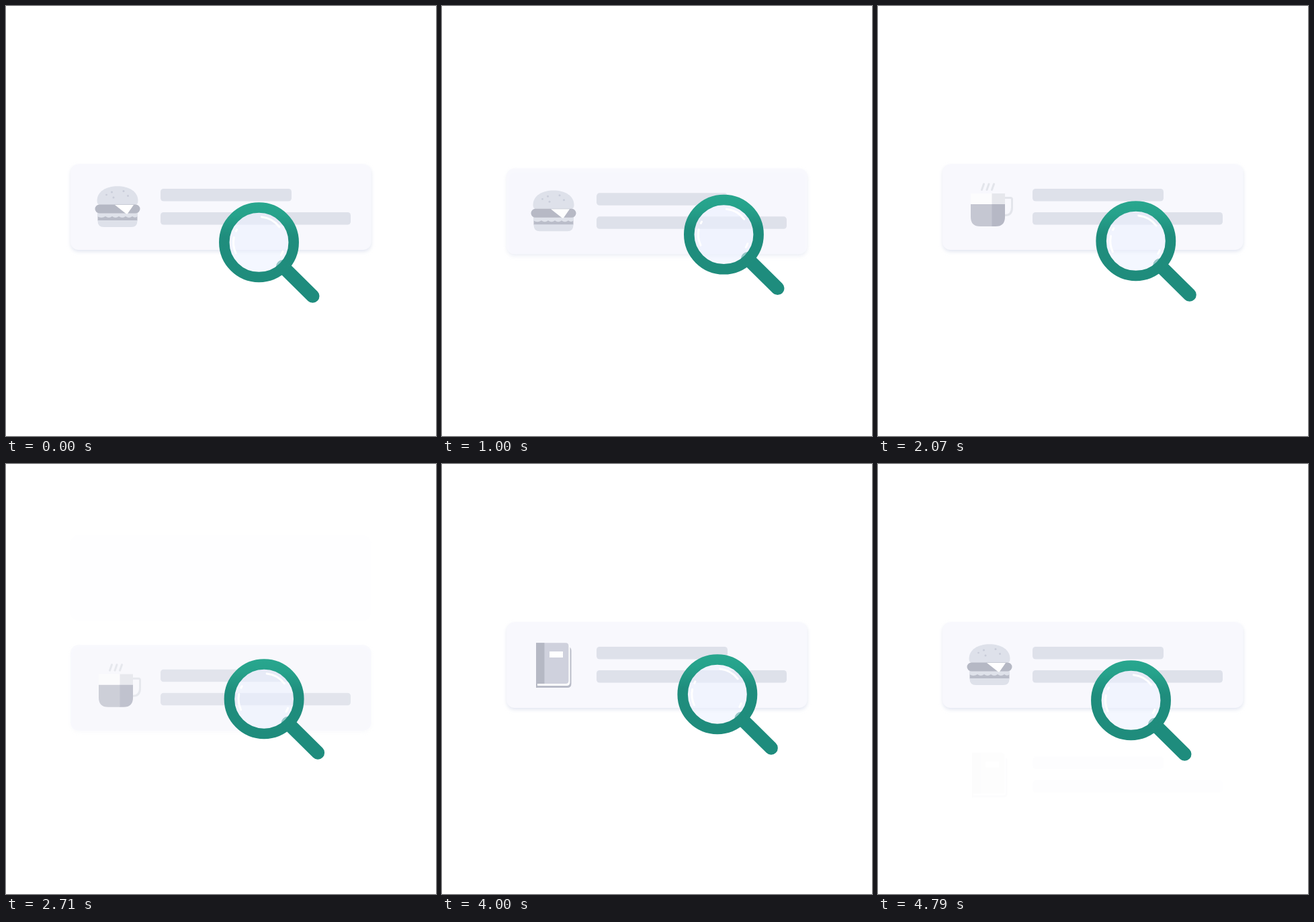
Write an HTML page that moves like this. It is 640x640 px and loops after 4870 ms.

```html
<!DOCTYPE html>
<html lang="en">
<head>
<meta charset="utf-8">
<title>Search cards</title>
<style>
  html, body { margin: 0; width: 100%; height: 100%; overflow: hidden; background: #fff; }
  svg { display: block; width: 100vw; height: 100vh; }
</style>
</head>
<body>
<svg viewBox="0 0 640 640" xmlns="http://www.w3.org/2000/svg">
  <defs>
    <filter id="soft" x="-10%" y="-20%" width="120%" height="140%">
      <feGaussianBlur stdDeviation="3"/>
    </filter>
    <linearGradient id="ring" gradientUnits="userSpaceOnUse" x1="0" y1="-58" x2="0" y2="58">
      <stop offset="0" stop-color="#28a68e"/>
      <stop offset=".15" stop-color="#26a28b"/>
      <stop offset=".42" stop-color="#1f8d7d"/>
      <stop offset="1" stop-color="#1f8c7c"/>
    </linearGradient>
    <g id="burger">
      <path fill="#dee1ea" d="M135.5 290C135.5 276 149 268.2 166 268.2S196.500 276 196.500 290Q196.500 296 191.500 296H140.500Q135.500 296 135.500 290Z"/>
      <g fill="#c8ccd9">
        <circle cx="157.500" cy="277" r="1.500"/>
        <circle cx="175" cy="275.500" r="1.500"/>
        <circle cx="149.500" cy="281" r="1.300"/>
        <circle cx="160" cy="285" r="1.500"/>
        <circle cx="181.500" cy="282.500" r="1.500"/>
      </g>
      <path fill="#b9bcc8" d="M136.500 308H195.500V319.500H136.500Z"/>
      <path fill="#dfe2ea" d="M136 308H196V313q-4 3.500-8 0q-5 4-10 0q-5 4-10 0q-5 4-10 0q-5 4-10 0q-6 4-12 0Z"/>
      <path fill="#dee1ea" d="M136.500 319H195.500V320Q195.500 329 186.500 329H145.500Q136.500 329 136.500 320Z"/>
      <rect x="132.500" y="295.500" width="67" height="13" rx="6.500" fill="#b5b8c4"/>
      <path fill="#fff" d="M162 296H190L181 309Q180 310 178.500 309Z"/>
    </g>
    <g id="cup">
      <g fill="none" stroke="#e3e5eb" stroke-width="3" stroke-linecap="round">
        <path d="M154.500 273.500L157.500 265M162 273.500L165 265M169.500 273.500L172.500 265"/>
        <path d="M189 285.500H197Q199.500 285.500 199.500 288V300Q199.500 311.500 189 311.500"/>
      </g>
      <path fill="#fcfcfd" d="M138 279H170V296H138Z"/>
      <path fill="#e6e7ec" d="M169.500 279H189V296H169.500Z"/>
      <path fill="#c5c7d2" d="M138 295H170V328H152Q138 328 138 314Z"/>
      <path fill="#b6b8c5" d="M169.500 295H189V314Q189 328 175 328H169.500Z"/>
    </g>
    <g id="book">
      <path fill="#b9bcc8" d="M140 272H187Q192.500 272 192.500 278V327Q192.500 333 186.500 333H140Z"/>
      <path fill="#fff" d="M142 268H185Q190.500 268 190.500 274V325Q190.500 330 185.500 330H142Z"/>
      <path fill="#cfd1dd" d="M140 266.200H184Q188.500 266.200 188.500 271V322.500Q188.500 327 184 327H140Z"/>
      <path fill="#b5b8c4" d="M140 266.200H152.500V327H140Z"/>
      <path fill="#b5b8c4" d="M140 326H142V333H140Z"/>
      <rect x="160" y="279" width="20" height="9" fill="#fff"/>
    </g>
  </defs>
  <g id="cards"></g>
  <g id="lens">
    <path d="M35.500 36L80 80" stroke="#1e8c7d" stroke-width="20" stroke-linecap="round"/>
    <circle r="45" fill="#ecf2ff" opacity=".58"/>
    <circle r="51.700" fill="none" stroke="url(#ring)" stroke-width="15.500"/>
    <g id="shine" fill="none" stroke="#fff" stroke-width="3" stroke-linecap="round"></g>
  </g>
</svg>
<script>
const FPS = 14, FRAMES = 68, LOOP = 4870;
const STARTS = [12.8, 35.15, 57.5], SLIDE = 9.5, PITCH = 163.5;
const TURNS = [0, 16.4, 33.5, 50.25, 67], REACH = 45.3;

const $ = id => document.getElementById(id);
const clamp = v => Math.min(1, Math.max(0, v));
const ease = v => (1 - Math.cos(Math.PI * clamp(v))) / 2;

const cards = ['burger', 'cup', 'book'].map(icon => {
  const g = document.createElementNS('http://www.w3.org/2000/svg', 'g');
  g.innerHTML = `
    <rect x="97" y="239" width="446" height="126" rx="11" fill="#dde1ee" filter="url(#soft)"/>
    <rect x="96" y="235.5" width="447.5" height="127.5" rx="12" fill="#f8f8fd"/>
    <g>
      <rect x="230" y="272" width="195" height="18.5" rx="4.5" fill="#dee1ea"/>
      <rect x="230" y="307" width="283" height="18.5" rx="4.5" fill="#dee1ea"/>
      <use href="#${icon}"/>
    </g>`;
  $('cards').append(g);
  return g;
});

// Glints on the glass: start and end angle in degrees
const polar = (r, deg) => {
  const a = deg * Math.PI / 180;
  return `${r * Math.cos(a)} ${r * Math.sin(a)}`;
};
$('shine').innerHTML = [[-84, -37], [206, 210], [155, 191], [21, 30]]
  .map(([a, b]) => `<path d="M${polar(38, a)}A38 38 0 0 1 ${polar(38, b)}"/>`).join('');

function place(card, y, shadow, panel, content) {
  card.setAttribute('visibility', 'visible');
  card.setAttribute('transform', `translate(0 ${y})`);
  [shadow, panel, content].forEach((o, i) => card.children[i].setAttribute('opacity', o));
}

function drawCards(f) {
  cards.forEach(c => c.setAttribute('visibility', 'hidden'));
  const n = STARTS.filter(s => s <= f).length - 1;
  if (n < 0) return place(cards[0], 0, 1, 1, 1);

  const u = (f - STARTS[n]) / SLIDE, move = ease(u);
  const fade = 1 - ease(u * 0.89);
  if (fade > 0) place(cards[n], PITCH * move, clamp(1 - u * 2.7), fade, fade);
  const show = ease((u - 0.38) / 0.5);
  place(cards[(n + 1) % 3], PITCH * (move - 1), show, clamp(u) ** 1.4, show);
}

function drawLens(f) {
  const i = Math.min(3, TURNS.filter(t => t <= f).length - 1);
  const part = ease((f - TURNS[i]) / (TURNS[i + 1] - TURNS[i]));
  const d = REACH * (i % 2 ? 1 - part : part);
  $('lens').setAttribute('transform', `translate(${376.5 + d} ${351.8 - 0.272 * d})`);
}

function render(ms) {
  // The motion advances in steps, 14 a second
  const f = Math.min(FRAMES - 1, Math.floor((ms % LOOP + 5) * FPS / 1000));
  drawCards(f);
  drawLens(f);
}

const start = performance.now();
function tick() {
  render(performance.now() - start);
  requestAnimationFrame(tick);
}
tick();
</script>
</body>
</html>
```
